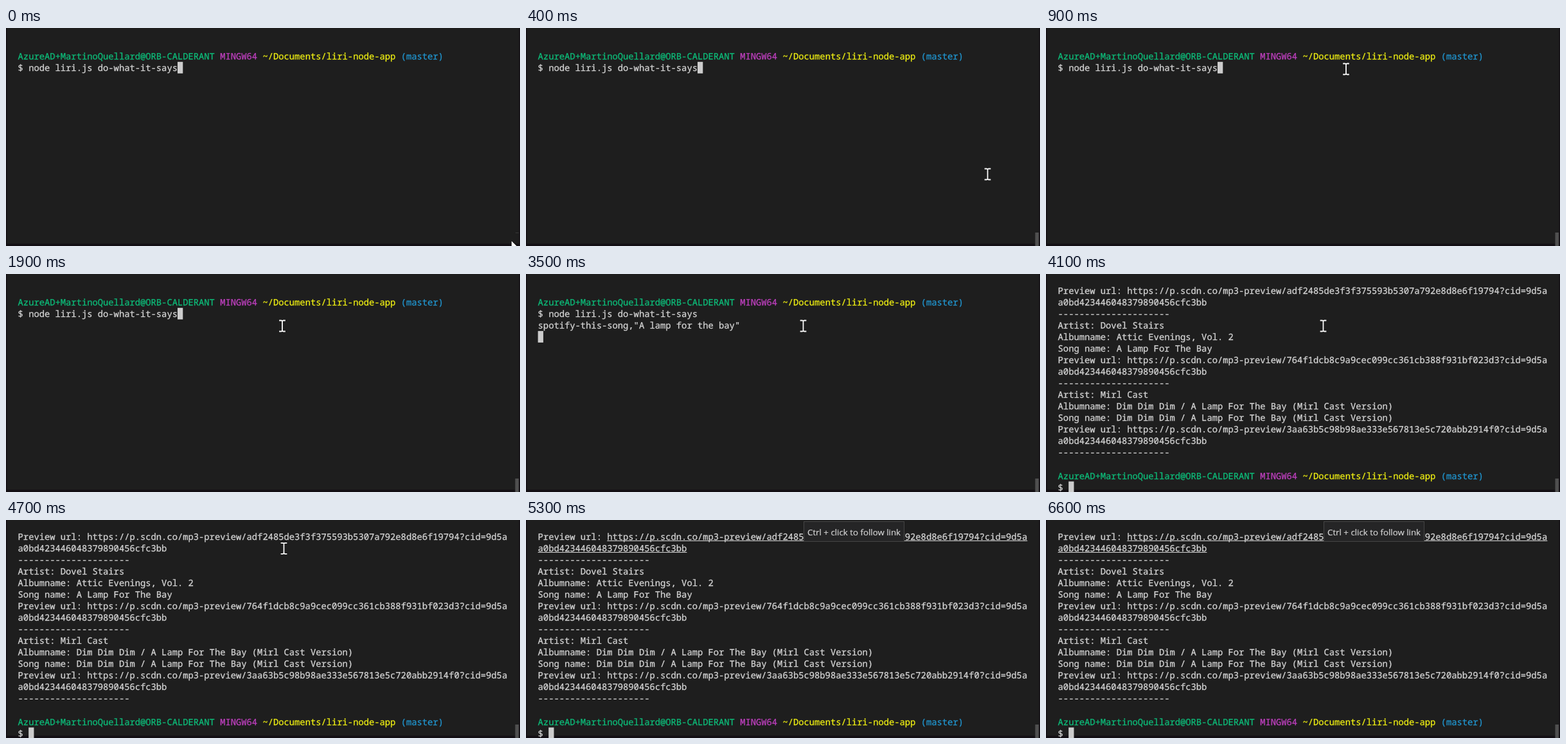
Recreate the animation shown at these times as an HTML page. Size 800 px wide and 340 px high, loop 6.7 s.

```html
<!DOCTYPE html>
<html lang="en">
<head>
<meta charset="utf-8">
<title>Terminal</title>
<style>
  html, body { margin: 0; width: 100%; height: 100%; overflow: hidden; background: #1e1e1e; }
  svg { display: block; width: 100vw; height: 100vh; }
  .term text {
    font: 13.8px "Noto Sans Mono", "DejaVu Sans Mono", monospace;
    white-space: pre;
    text-rendering: geometricPrecision;
    fill: currentColor;
    stroke: currentColor;
    stroke-width: .3px;
    color: #d4d4d4;
  }
  .tip text {
    font: 13.3px "Open Sans", "Noto Sans", sans-serif;
    fill: #d4d4d4;
    stroke: #d4d4d4;
    stroke-width: .2px;
  }
</style>
</head>
<body>
<svg viewBox="0 0 800 340">
  <rect width="800" height="340" fill="#1e1e1e"/>
  <path d="M0 0H1.5V336.5H798.5V0H800V340H0Z" fill="#130f14"/>
  <rect id="mark" x="793" y="319" width="5" height="1" fill="#383838"/>
  <rect id="thumb" x="792.5" y="319" width="5.5" height="21" fill="#4f4f4f"/>
  <g class="term">
    <g id="before"></g>
    <g id="after"></g>
  </g>
  <g id="link" fill="#d4d4d4"></g>
  <rect id="caret" width="8.3" height="18" fill="#cccccc"/>
  <g id="tip" class="tip">
    <rect x="432.5" y="2.5" width="156" height="31" fill="#252526" stroke="#454545"/>
    <text x="438" y="24">Ctrl + click to follow link</text>
  </g>
  <path id="arrow" d="M0 0V16L3.8 12.4L6.4 18.2L9 17L6.5 11.4H11.6Z" fill="#fff" stroke="#111" stroke-width=".8"/>
  <g id="beam" fill="none" stroke-linecap="square">
    <path d="M-4 -8.5H-1.5L0 -7.7L1.5 -8.5H4M0 -7.7V7.7M-4 8.5H-1.5L0 7.7L1.5 8.5H4" stroke="#111" stroke-width="3.2"/>
    <path d="M-4 -8.5H-1.5L0 -7.7L1.5 -8.5H4M0 -7.7V7.7M-4 8.5H-1.5L0 7.7L1.5 8.5H4" stroke="#fff" stroke-width="1.8"/>
  </g>
</svg>
<script>
const LOOP = 6700, STEP = 100;
const LEFT = 18.6, CELL = 8.28, TOP = 30.7, ROW = 18.05;
const $ = id => document.getElementById(id);
const baseline = row => TOP + row * ROW;
const column = col => LEFT + col * CELL;

function make(parent, name, attrs, text) {
  const el = document.createElementNS("http://www.w3.org/2000/svg", name);
  for (const key in attrs) el.setAttribute(key, attrs[key]);
  if (text) el.textContent = text;
  return parent.appendChild(el);
}

const line = (parent, row, text) =>
  make(parent, "text", { x: LEFT, y: baseline(row) }, text);

function prompt(parent, row) {
  const el = line(parent, row, "");
  [["AzureAD+MartinoQuellard@ORB-CALDERANT ", "#0dbc79"],
   ["MINGW64 ", "#bc3fbc"],
   ["~/Documents/liri-node-app ", "#eded12"],
   ["(master)", "#2196d0"]
  ].forEach(([text, color]) =>
    make(el, "tspan", { style: `fill:${color};stroke:${color}` }, text));
}

prompt($("before"), 1);
line($("before"), 2, "$ node liri.js do-what-it-says");
const reply = line($("before"), 3, 'spotify-this-song,"A lamp for the bay"');

const rule = "-".repeat(21);
const tail = "a0bd423446048379890456cfc3bb";
const preview = id => ["Preview url: https://p.scdn.co/mp3-preview/" + id + "?cid=9d5a", tail, rule];
const song = (artist, album, name, id) =>
  ["Artist: " + artist, "Albumname: " + album, "Song name: " + name, ...preview(id)];
const medley = "Dim Dim Dim / A Lamp For The Bay (Mirl Cast Version)";

[
  ...preview("adf2485de3f3f375593b5307a792e8d8e6f19794"),
  ...song("Dovel Stairs", "Attic Evenings, Vol. 2", "A Lamp For The Bay",
    "764f1dcb8c9a9cec099cc361cb388f931bf023d3"),
  ...song("Mirl Cast", medley, medley,
    "3aa63b5c98b98ae333e567813e5c720abb2914f0")
].forEach((text, row) => line($("after"), row, text));
prompt($("after"), 16);
line($("after"), 17, "$ ");

[[0, 13, 92], [1, 0, tail.length]].forEach(([row, from, to]) =>
  make($("link"), "rect", {
    x: column(from), y: Math.round(baseline(row) + 1.3), width: (to - from) * CELL, height: 1
  }));

// Mouse path: time, x, y
const path = [
  [0, 786.5, 331.5], [100, 782, 322], [700, 655, 134], [900, 467, 64],
  [1100, 431, 78], [1300, 430, 90], [1800, 430, 90], [1900, 430, 81],
  [2000, 431.5, 81], [4500, 431.5, 81], [4800, 433, 26], [5000, 436, -14]
];

function mouse(t) {
  const i = path.findIndex(p => p[0] > t);
  if (i < 0) return path[path.length - 1].slice(1);
  const [t0, x0, y0] = path[i - 1], [t1, x1, y1] = path[i];
  const k = (t - t0) / (t1 - t0);
  return [x0 + (x1 - x0) * k, y0 + (y1 - y0) * k];
}

const show = (el, on) => el.setAttribute("display", on ? "inline" : "none");

function caretCell(t) {
  if (t < 2600) return [2, 30];
  if (t < 3400) return [3, 0];
  if (t < 3900) return [4, 0];
  return [17, 2];
}

function draw(t) {
  const listed = t >= 3900;
  show($("before"), !listed);
  show($("after"), listed);
  show(reply, t >= 3400);
  show($("mark"), t < 100);
  show($("thumb"), t >= 100);
  show($("link"), t >= 4800);

  const [row, col] = caretCell(t);
  $("caret").setAttribute("x", column(col));
  $("caret").setAttribute("y", baseline(row) - 14);

  const place = `translate(${mouse(t).join(" ")})`;
  $("arrow").setAttribute("transform", place);
  $("beam").setAttribute("transform", place);
  show($("arrow"), t < 200);
  show($("beam"), t >= 200 && t < 5000);

  $("tip").setAttribute("opacity", Math.max(0, Math.min(1, (t - 4900) / 300)));
}

const start = performance.now();
function tick() {
  const t = (performance.now() - start) % LOOP;
  draw(Math.floor(t / STEP) * STEP);
  requestAnimationFrame(tick);
}
tick();
</script>
</body>
</html>
```
